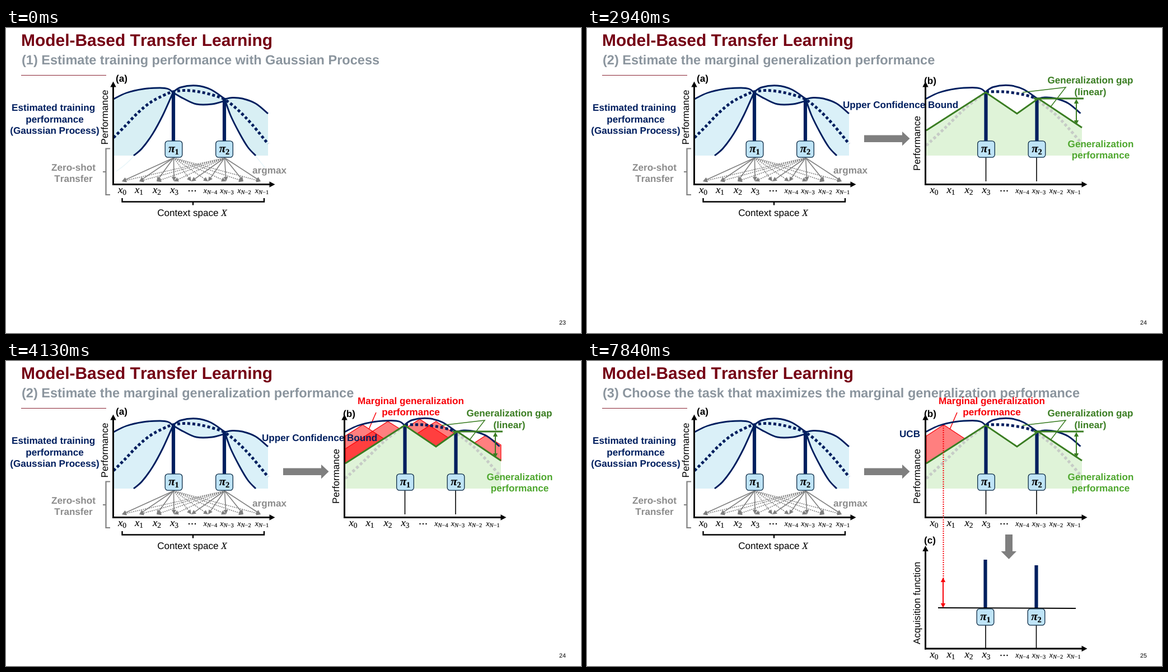
An HTML page that plays this animation: 1027 by 545 pixels, repeating every 8 s.

```html
<!DOCTYPE html>
<html lang="en">
<head>
<meta charset="utf-8">
<title>Model-Based Transfer Learning</title>
<style>
html, body { margin: 0; width: 100%; height: 100%; overflow: hidden; background: #fff; }
svg { display: block; width: 100%; height: 100%; }
text { font: 17.1px "Liberation Sans", Arial, sans-serif; font-kerning: none; text-rendering: geometricPrecision; }
.b { font-weight: bold; }
.math { font-family: "Liberation Serif", serif; font-style: italic; stroke: #000; stroke-width: .15; }
.up { font-style: normal; }
</style>
</head>
<body>
<svg id="stage" viewBox="0 0 1027 545" fill="none"></svg>
<script>
const NAVY = '#001f5f', GRAY = '#7f7f7f', GREEN = '#3a7d22', LIME = '#4ea72e', RED = '#f80008';
const BASE = 280;

const group = (id, ...parts) => `<g id="${id}">${parts.join('')}</g>`;
const shift = (x, y, ...parts) => `<g transform="translate(${x} ${y})">${parts.join('')}</g>`;
const path = (d, stroke, width, extra = '') => `<path d="${d}" stroke="${stroke}" stroke-width="${width}" ${extra}/>`;
const shape = (d, fill, extra = '') => `<path d="${d}" fill="${fill}" ${extra}/>`;
const line = (x1, y1, x2, y2, stroke, width, extra) => path(`M${x1} ${y1}L${x2} ${y2}`, stroke, width, extra);
const dash = pattern => `stroke-dasharray="${pattern}"`;

function text(str, x, y, { fill = '#000', size = 17.1, bold = true, anchor = 'middle', extra = '' } = {}) {
  return `<text x="${x}" y="${y}" fill="${fill}" text-anchor="${anchor}" class="${bold ? 'b' : ''}" style="font-size:${size}px" ${extra}>${str}</text>`;
}
const lines = (rows, x, y, fill) => rows.map((row, i) => text(row, x, y + i * 20.6, { fill })).join('');
const upright = (str, x, y) => text(str, 0, 0, { bold: false, extra: `transform="translate(${x} ${y}) rotate(-90)"` });

// Catmull-Rom spline; the result starts with M, or with L when it continues a path.
function curve(points, start = 'M') {
  let d = start + points[0];
  for (let i = 0; i + 1 < points.length; i++) {
    const p1 = points[i], p2 = points[i + 1], p0 = points[i - 1] || p1, p3 = points[i + 2] || p2;
    const c1 = p1.map((v, k) => v + (p2[k] - p0[k]) / 6);
    const c2 = p2.map((v, k) => v - (p3[k] - p1[k]) / 6);
    d += `C${c1} ${c2} ${p2}`;
  }
  return d;
}

// Arrowhead with its tip at (x, y), pointing along the angle in degrees.
const head = (x, y, angle, length, half, fill) =>
  `<path transform="translate(${x} ${y}) rotate(${angle})" d="M0 0L${-length} ${-half}V${half}Z" fill="${fill}"/>`;

function doubleArrow(x, top, bottom, color) {
  return line(x, top + 4, x, bottom - 4, color, 2) +
    head(x, top, -90, 8, 4.2, color) + head(x, bottom, 90, 8, 4.2, color);
}

function axes(x) {
  return line(x, BASE + 1, x, 103, '#000', 3) + head(x, 95.5, -90, 10, 5.2, '#000') +
    line(x - 1.5, BASE - .5, x + 282, BASE - .5, '#000', 3) + head(x + 289, BASE - .5, 0, 10, 5.2, '#000');
}

function ticks() {
  const centers = [207.5, 237.5, 269.5, 300.5, 332.5, 365, 394.5, 425.5, 457];
  return centers.map((x, i) => {
    if (i === 4) return [-5.5, 0, 5.5].map(d => `<circle cx="${x + d}" cy="291" r="1.2" fill="#000"/>`).join('');
    const far = i > 4, size = far ? 14 : 19, sub = far ? 10.5 : 13.5;
    const index = far ? `N<tspan class="up">−${9 - i}</tspan>` : `<tspan class="up">${i}</tspan>`;
    return `<text class="math" x="${x}" y="295" fill="#000" text-anchor="middle" style="font-size:${size}px">x<tspan dy="${far ? 2 : 3}" style="font-size:${sub}px">${index}</tspan></text>`;
  }).join('');
}

function policy(n, x, y) {
  return `<rect x="${x - 15.3}" y="${y - 14.7}" width="30.6" height="29.4" rx="5" fill="#bfe4f7" stroke="#0b2a45" stroke-width="1.3"/>` +
    `<text class="math b" x="${x}" y="${y + 5}" fill="#000" text-anchor="middle" style="font-size:21px">π<tspan class="up" dy="4" style="font-size:14.5px">${n}</tspan></text>`;
}

const upper = [
  [[192, 127], [215, 116], [245, 109], [275, 107], [290, 109], [298, 115]],
  [[298, 115], [312, 106], [340, 103], [366, 110], [391, 127]],
  [[391, 127], [404, 124.5], [422, 126], [446, 135], [468, 153]]
];
const lower = [
  [[298, 116], [280, 156], [262, 189], [243, 215], [228, 228]],
  [[391, 130], [368, 136], [340, 136], [317, 126], [298, 115]],
  [[391, 128], [401, 156], [417, 188], [432, 213], [446, 228]]
];
const mean = [[192, 196], [212, 176], [235, 152], [258, 133], [280, 121], [298, 114], [320, 111.5], [345, 114], [370, 120], [391, 128], [415, 147], [440, 173], [468, 207]];
const bound = () => upper.map(p => path(curve(p), NAVY, 2.9)).join('');
const bars = () => line(299, 115, 299, 203, NAVY, 6.2) + line(390, 125, 390, 203, NAVY, 6.2);

function transfers() {
  const targets = [207, 238, 269, 300, 331, 361, 393, 424, 455];
  return [299.5, 390.5].map((from, k) => targets.map((to, i) => {
    const angle = Math.atan2(42, to - from), solid = (i > 3) === (k === 1);
    const endX = to - 5 * Math.cos(angle), endY = 274 - 5 * Math.sin(angle);
    return line(from, 232, endX, endY, GRAY, 1.6, solid ? '' : dash('2 1.6')) +
      head(to, 274, angle * 180 / Math.PI, 8, 4, GRAY);
  }).join('')).join('');
}

function gaussianChart() {
  const band = curve(upper[0]) + curve(lower[0], 'L') + 'H192Z' +
    curve(upper[1]) + curve(lower[1], 'L') + 'Z' +
    curve([...lower[2]].reverse()) + curve(upper[2], 'L') + 'V228Z';
  return shape(band, '#daf0f8', 'id="band"') +
    group('tails', path('M228 229Q215 244 197 256M446 229L463 250', '#e9f6fa', 1.5)) +
    bound() + lower.map(p => path(curve(p), NAVY, 2.9)).join('') +
    path(curve(mean), NAVY, 5, dash('5 4')) + bars() + axes(191.5) + transfers() +
    policy(1, 299.5, 216.5) + policy(2, 390, 216.5) + ticks() +
    path('M186 215.500H178.500V298H186M178.500 257H173', GRAY, 2.2) +
    path('M207.500 304V310.500H461V304M334 310.500V316.500', '#000', 2.4) +
    text('(a)', 196, 96, { anchor: 'start' }) + upright('Performance', 182, 159.5) +
    lines(['Estimated training&nbsp;', 'performance', '(Gaussian Process)'], 87, 148, NAVY) +
    lines(['Zero-shot', 'Transfer'], 120.5, 254.5, '#8c8c8c') +
    text('argmax', 470.5, 260, { fill: '#8c8c8c' }) +
    text('Context space <tspan class="math">X</tspan>', 332.5, 335.5, { bold: false });
}

function generalizationChart() {
  const best = 'M606 183L712 115L768 153L806 126L884 178';
  return shape(best + 'V228H606Z', '#dff3d8') +
    path(curve([[606, 210], [640, 178], [676, 143], [708, 118]]), '#c6cbc6', 5, dash('5 4')) +
    path(curve([[806, 130], [835, 153], [860, 179], [884, 207]]), '#c6cbc6', 5, dash('5 4')) +
    group('red',
      group('others', ['M606 157L682 108L703 121L606 183Z', 'M717 118L739 104L790 137L768 153Z',
        'M734 130L768 108L800 129L768 153Z', 'M837 146L857 133L884 150V178Z'].map(redArea).join('')),
      redArea('M606 134L637 114L675 139L606 183Z'),
      line(661, 92, 648, 122, RED, 1.5)) +
    shift(413.5, -.5, bound(), bars()) +
    path(curve([[713, 114], [745, 114], [780, 119], [803, 126]]), NAVY, 5, dash('5 4')) +
    path(best, GREEN, 3) + line(798, 126, 887, 126, GREEN, 3) + doubleArrow(874, 127, 173, GREEN) +
    path('M778 115L855 106L828 141', GREEN, 1.5) +
    line(712.5, 231, 712.5, 274, '#000', 1.6) + line(803, 231, 803, 274, '#000', 1.6) +
    axes(604.5) + policy(1, 713, 216.5) + policy(2, 803.5, 216.5) + shift(412.5, 0, ticks()) +
    text('(b)', 602, 100, { anchor: 'start' }) + upright('Performance', 594.5, 206) +
    lines(['Generalization gap', '(linear)'], 899, 99, GREEN) +
    lines(['Generalization', 'performance'], 917.5, 212.5, LIME) +
    shape('M495 191.500H563V185L576.500 197.500L563 210.500V204H495Z', GRAY);
}
const redArea = d => shape(d, '#ff000080', `stroke="${RED}" stroke-width="1.2"`);

function acquisitionChart() {
  const x1 = 711.5, x2 = 802.5;
  return shift(0, 234.5, axes(604.5)) + shift(412.5, 235, ticks()) +
    line(x1, 355, x1, 442, NAVY, 6.2) + line(x2, 365, x2, 442, NAVY, 6.2) +
    path('M627 441L873 442', '#000', 2) +
    line(x1 + .5, 472, x1 + .5, 514, '#000', 1.6) + line(x2, 472, x2, 514, '#000', 1.6) +
    policy(1, x1, 457.5) + policy(2, x2, 457.5) +
    text('(c)', 602, 326, { anchor: 'start' }) + upright('Acquisition function', 594.5, 432.5) +
    shape('M747 310H760V340H767L753.500 354L739.500 340H747Z', GRAY);
}

const subtitles = [
  '(1) Estimate training performance with Gaussian Process',
  '(2) Estimate the marginal generalization performance',
  '(3) Choose the task that maximizes the marginal generalization performance'
];
const stage = document.getElementById('stage');
stage.innerHTML =
  text('Model-Based Transfer Learning', 27, 31.5, { fill: '#750014', size: 29.95, anchor: 'start' }) +
  text('', 28, 65, { fill: '#8b959e', size: 23.53, anchor: 'start', extra: 'id="subtitle"' }) +
  line(27, 84.5, 179, 84.5, '#8a2433', 1.2) +
  gaussianChart() +
  group('chartB', generalizationChart()) +
  group('chartC', acquisitionChart()) +
  text('', 457, 143, { fill: NAVY, anchor: 'start', extra: 'id="boundLabel"' }) +
  group('redLabel', lines(['Marginal generalization', 'performance'], 723, 76.5, RED)) +
  group('choice', line(636.5, 115, 636.5, 390, RED, 2, dash('2 2')), doubleArrow(636, 387, 441, RED)) +
  text('', 994, 530, { size: 10.7, bold: false, extra: 'id="page"' });

const el = id => document.getElementById(id);
const show = (id, opacity) => el(id).setAttribute('opacity', +opacity);
let currentSlide = -1;

function setSlide(slide) {
  if (slide === currentSlide) return;
  currentSlide = slide;
  el('subtitle').textContent = subtitles[slide];
  el('page').textContent = 23 + slide;
  el('band').setAttribute('fill', slide ? '#daf0f8' : '#d8eff4');
  const label = el('boundLabel');
  label.textContent = ['', 'Upper Confidence Bound', 'UCB'][slide];
  label.setAttribute('x', slide === 2 ? 558 : 457);
  label.setAttribute('y', slide === 2 ? 136 : 143);
  show('tails', slide === 0);
  show('chartB', slide > 0);
  show('chartC', slide === 2);
  show('others', slide === 1);
}

function draw() {
  const t = performance.now() % 8000;
  const slide = t < 1820 ? 0 : t < 6580 ? 1 : 2;
  const chosen = t >= 7840;
  const red = slide === 1 ? (t >= 3990 ? 1 : t >= 3920 ? .5 : 0) : +chosen;
  setSlide(slide);
  show('red', red);
  show('redLabel', red);
  show('choice', chosen);
  requestAnimationFrame(draw);
}
draw();
</script>
</body>
</html>
```
